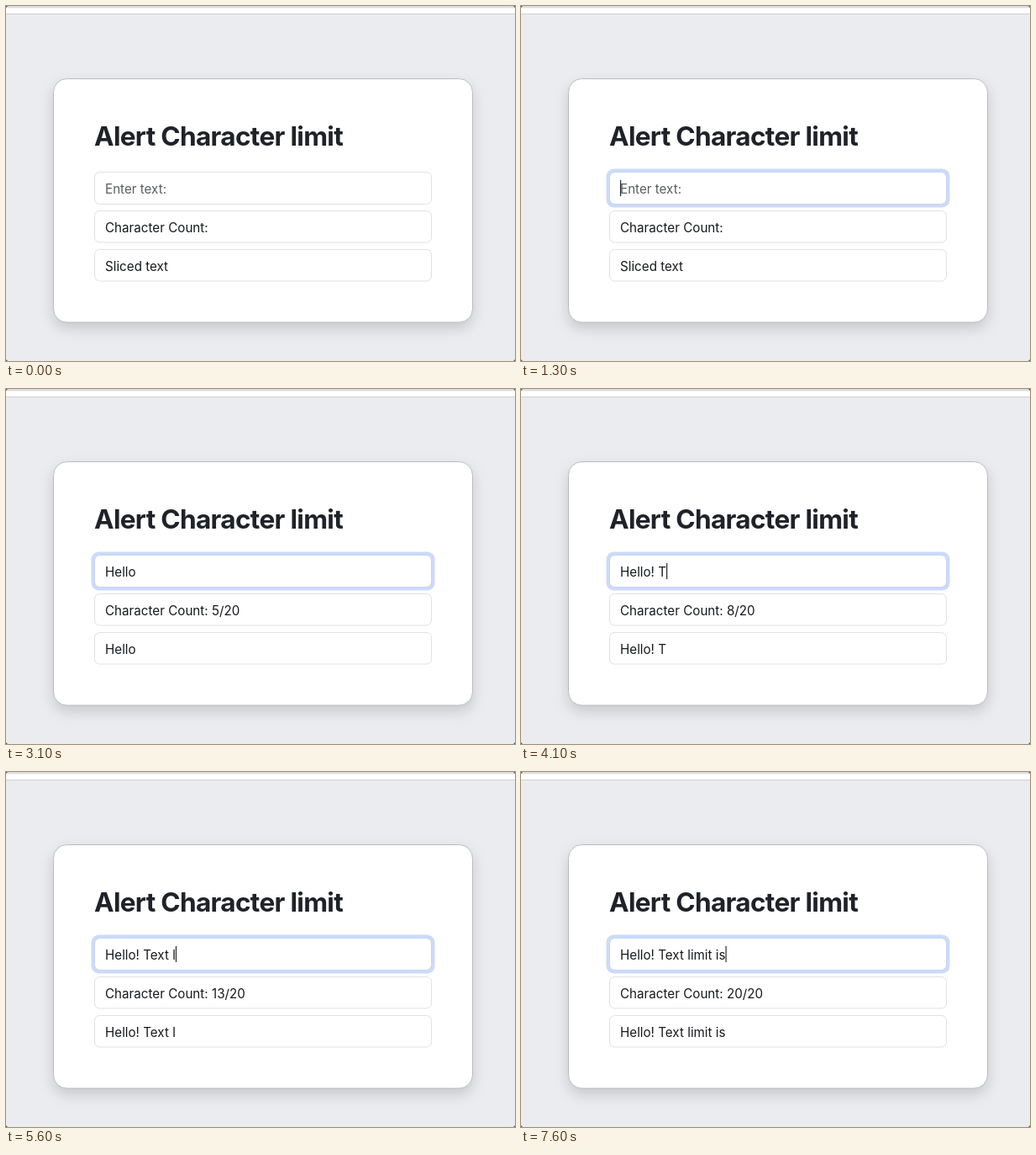
An HTML page for the animation above (8 s loop, 606x422 px).

```html
<!DOCTYPE html>
<html lang="en">
<head>
<meta charset="utf-8">
<title>Alert Character limit</title>
<style>
  html, body { margin: 0; width: 100%; height: 100%; overflow: hidden; background: #ebecf0; }
  svg { display: block; width: 100%; height: 100%; }
  text { font: 15.2px Inter, "Noto Sans", sans-serif; font-optical-sizing: none; fill: #17191d; white-space: pre; }
  .title { font-size: 31.6px; font-weight: 700; letter-spacing: -0.7px; fill: #1f2228; }
  .field { fill: #fff; stroke: #dfe1e5; }
  .card { fill: #fff; stroke: #bcbcc0; filter: drop-shadow(0 7px 8px rgba(0, 0, 0, .15)); }
</style>
</head>
<body>
<svg viewBox="0 0 606 422">
  <rect width="606" height="422" fill="#ebecf0"/>
  <rect width="606" height="2.5" fill="#dcdde1"/>
  <rect y="2.5" width="606" height="6.5" fill="#fff"/>
  <rect y="9" width="606" height="1" fill="#cfcfd2"/>
  <path d="M0 0h2l-2 2zM606 0v2l-2-2zM0 422v-2l2 2zM606 422h-2l2-2z" fill="#55565a"/>

  <rect class="card" x="56.5" y="86.5" width="499" height="289.5" rx="16"/>
  <text class="title" x="105" y="166">Alert Character limit</text>

  <rect id="ring" x="101.5" y="193.5" width="409" height="46" rx="9" fill="#cddaf8"/>
  <rect class="field" x="105.5" y="197.5" width="401" height="38" rx="6"/>
  <rect id="edge" x="105.5" y="197.5" width="401" height="38" rx="6" fill="none" stroke="#c6d5f7"/>
  <rect class="field" x="105.5" y="243.5" width="401" height="37.5" rx="6"/>
  <rect class="field" x="105.5" y="289.5" width="401" height="37.5" rx="6"/>

  <text id="entry" x="118" y="222.5"></text>
  <text id="count" x="118" y="268.5"></text>
  <text id="slice" x="118" y="314.5"></text>
  <rect id="caret" y="207" width="1.2" height="19" fill="#25282c"/>
</svg>
<script>
const LOOP = 8000, FOCUS = 300, BLINK = 500, LIMIT = 20;
const message = "Hello! Text limit is";
const keyTimes = [1400, 1800, 2200, 2400, 2600, 3400, 3700, 4100, 4400, 4700,
                  4900, 5100, 5600, 5800, 6100, 6300, 6900, 7100, 7400, 7600];
const $ = id => document.getElementById(id);
const [ring, edge, entry, count, slice, caret] =
  ["ring", "edge", "entry", "count", "slice", "caret"].map($);

function setText(el, value) {
  if (el.textContent !== value) el.textContent = value;
}

function draw(t) {
  const n = keyTimes.filter(k => k <= t).length;
  const typed = message.slice(0, n);

  const glow = t < FOCUS ? 0 : t < FOCUS + 100 ? 0.6 : 1;
  ring.setAttribute("opacity", glow);
  edge.setAttribute("opacity", glow);

  setText(entry, typed || "Enter text:");
  entry.style.fill = n ? "" : "#585b60";
  setText(count, "Character Count:" + (n ? ` ${n}/${LIMIT}` : ""));
  setText(slice, typed || "Sliced text");

  // Each key press restarts the blink.
  const since = t - (n ? keyTimes[n - 1] : FOCUS);
  const shown = since >= 0 && Math.floor(since / BLINK) % 2 === 0;
  caret.setAttribute("visibility", shown ? "visible" : "hidden");
  caret.setAttribute("x", 118 + (n ? entry.getSubStringLength(0, n) : 0));
}

const start = performance.now();
function tick() {
  draw((performance.now() - start) % LOOP);
  requestAnimationFrame(tick);
}
tick();
</script>
</body>
</html>
```
